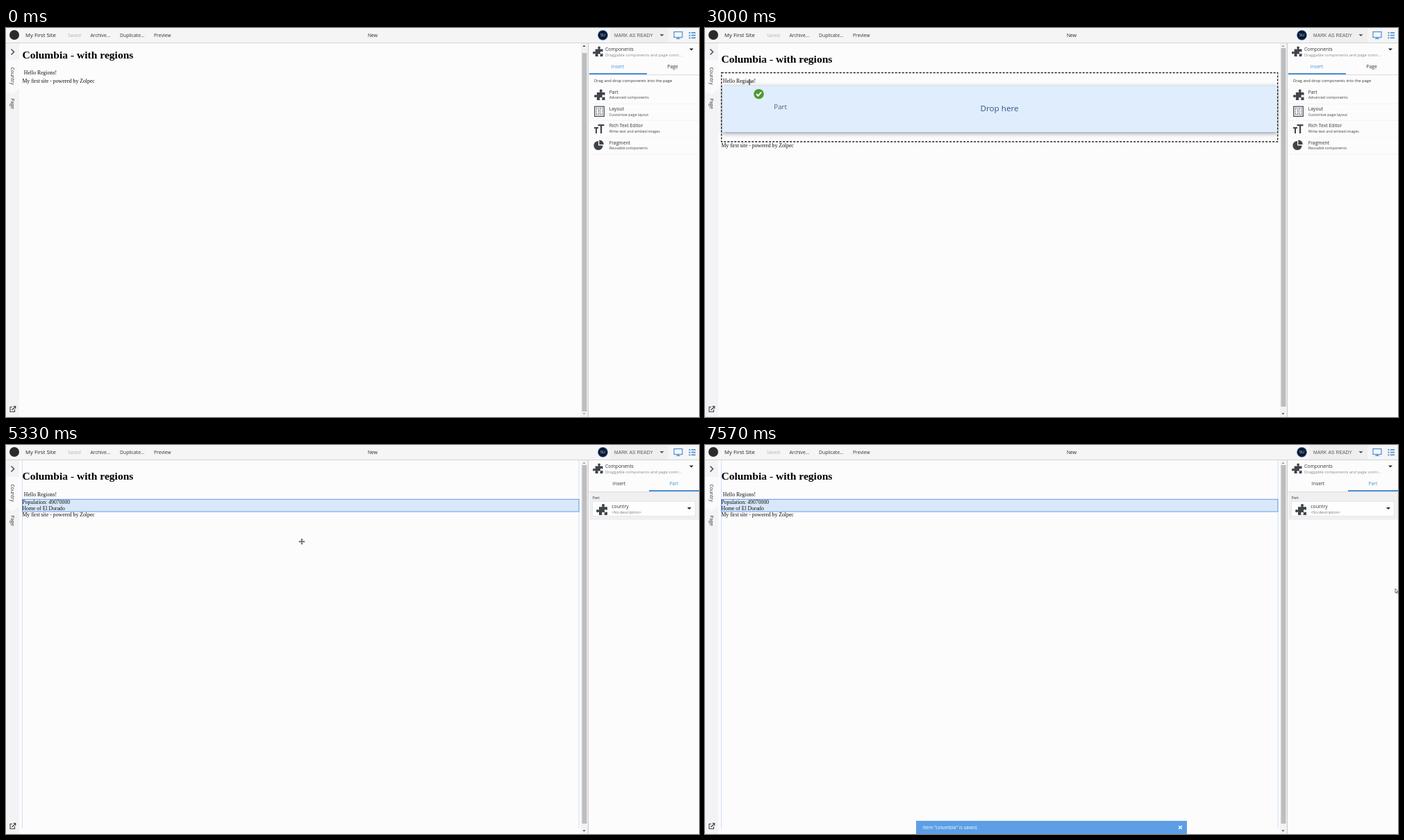
An HTML page with a canvas that plays this animation: 998 by 561 pixels, repeating every 8730 ms.

```html
<!DOCTYPE html>
<html lang="en">
<head>
<meta charset="utf-8">
<title>Page editor</title>
<style>
html, body { margin: 0; width: 100%; height: 100%; overflow: hidden; background: #fcfcfd; }
canvas { display: block; }
</style>
</head>
<body>
<canvas id="stage" width="998" height="561"></canvas>
<script>
const ctx = document.getElementById('stage').getContext('2d');
const LOOP = 8730;
const UI = '"Open Sans", sans-serif';
const SERIF = '"Liberation Serif", serif';
const ARIAL = '"Liberation Sans", sans-serif';
const INK = '#333', ICON = '#3f444b', BLUE = '#4a90d4', PAPER = '#fcfcfd', BAR = '#f5f5f6';

// Moments (ms) at which the scene changes state
const AT = { enter: 530, grab: 1570, overPage: 1720, overRegion: 2470, drop: 3370,
  focus: 4270, open: 4500, pick: 5330, toast: 5413, arrow: 6230 };

// Pointer positions: time, x, y
const TRACK = [
  [530, 994, 176], [970, 907, 98], [1270, 882, 95], [1570, 882, 95],
  [2170, 235, 103], [2470, 130, 90], [2900, 64, 78], [3400, 64, 78],
  [4200, 545, 112], [4570, 545, 112], [4970, 426, 139], [6230, 426, 140],
  [6260, 425, 135], [6870, 425, 135], [7570, 994, 207]
];

const PUZZLE = new Path2D('M.25 .27H.53C.58 .2 .5 .17 .5 .11A.13 .11 0 0 1 .76 .11C.76 .17 .68 .2 .73 .27H1V.53' +
  'C.93 .58 .9 .5 .84 .5A.1 .13 0 0 0 .84 .76C.9 .76 .93 .68 1 .73V1H.73C.68 .93 .76 .9 .76 .84' +
  'A.13 .1 0 0 0 .5 .84C.5 .9 .58 .93 .53 1H.25V.73C.2 .68 .17 .76 .11 .76A.11 .13 0 0 1 .11 .5C.17 .5 .2 .58 .25 .53Z');
const ARROW = new Path2D('M0 0V7.4L1.7 5.9L2.8 8.4L3.9 7.9L2.8 5.4H5Z');
const HAND = new Path2D('M-.8 0Q0 -.8 .8 0V3L3.6 3.8Q4.2 4.2 4 5.5L3.2 8.5H-1L-3 5.4Q-3 4.5 -2 4.8L-.8 5.8Z');
const CROSS = new Path2D('M0 -5L1.6 -3H.6V-.6H3V-1.6L5 0L3 1.6V.6H.6V3H1.6L0 5L-1.6 3H-.6V.6H-3V1.6L-5 0L-3 -1.6V-.6H-.6V-3H-1.6Z');

function rect(x, y, w, h, color) {
  ctx.fillStyle = color;
  ctx.fillRect(x, y, w, h);
}

function frame(x, y, w, h, color, width = 1) {
  ctx.strokeStyle = color;
  ctx.lineWidth = width;
  ctx.strokeRect(x, y, w, h);
}

function disc(x, y, r, color) {
  ctx.fillStyle = color;
  ctx.beginPath();
  ctx.arc(x, y, r, 0, Math.PI * 2);
  ctx.fill();
}

function poly(points, color) {
  ctx.fillStyle = color;
  ctx.beginPath();
  points.forEach(([x, y]) => ctx.lineTo(x, y));
  ctx.fill();
}

function line(points, color, width = 1) {
  ctx.strokeStyle = color;
  ctx.lineWidth = width;
  ctx.beginPath();
  points.forEach(([x, y], i) => i ? ctx.lineTo(x, y) : ctx.moveTo(x, y));
  ctx.stroke();
}

// y is the middle of the capital letters
function text(str, x, y, size = 6.8, color = INK, { font = UI, style = '', align = 'left' } = {}) {
  ctx.font = `${style} ${size}px ${font}`;
  ctx.textAlign = align;
  ctx.fillStyle = color;
  ctx.fillText(str, x, y + size * 0.35);
}

function shape(path, x, y, scale, fill, stroke) {
  ctx.save();
  ctx.translate(x, y);
  ctx.scale(scale, scale);
  ctx.fillStyle = fill;
  ctx.fill(path);
  if (stroke) {
    ctx.strokeStyle = stroke;
    ctx.lineWidth = 0.8;
    ctx.stroke(path);
  }
  ctx.restore();
}

const puzzle = (x, y, size, color = ICON) => shape(PUZZLE, x, y, size, color);
const caret = (x, y, color = '#222', r = 3) => poly([[x - r, y - r / 2], [x + r, y - r / 2], [x, y + r / 2]], color);
const serif = (str, x, y) => text(str, x, y, 7.78, '#111', { font: SERIF });

function pointerAt(t) {
  const i = TRACK.findIndex(k => k[0] > t);
  if (i < 0) return TRACK[TRACK.length - 1].slice(1);
  if (i === 0) return TRACK[0].slice(1);
  const [t0, x0, y0] = TRACK[i - 1], [t1, x1, y1] = TRACK[i];
  const p = (t - t0) / (t1 - t0);
  return [x0 + (x1 - x0) * p, y0 + (y1 - y0) * p];
}

function drawTopBar(t) {
  rect(0, 0, 998, 21, BAR);
  rect(0, 21, 998, 1, '#d2d2d4');
  disc(12, 10, 7, '#2b2b2b');
  text('My First Site', 28, 10.5, 7.78, '#222');
  const dirty = t >= AT.drop && t < AT.pick;
  const shift = dirty ? -4.2 : 0;
  text(dirty ? 'Save' : 'Saved', 89, 10.5, 6.8, dirty ? INK : '#b4b4b6');
  text('Archive...', 121.5 + shift, 10.5);
  text('Duplicate...', 164 + shift, 10.5);
  text('Preview', 213 + shift, 10.5);
  text('New', 528 + shift / 2, 10.5, 6.8, '#222', { align: 'center' });

  disc(859.5, 10.3, 7.4, '#4b7fb5');
  disc(859.5, 10.3, 6.6, '#0c1a33');
  text('SU', 859.5, 10.4, 5.4, '#dde6f2', { align: 'center' });
  rect(870, 0, 84, 21, '#efeff0');
  text('MARK AS READY', 876, 10.3, 6.8, '#5a5a5c', { font: ARIAL });
  caret(944.5, 10.5, '#555');
  frame(962, 5.5, 12, 8, BLUE, 1.2);
  rect(967, 14, 2, 2, BLUE);
  rect(965, 15, 6, 1, BLUE);
  for (const y of [6, 9.7, 13.4]) {
    rect(983.5, y, 2, 2, BLUE);
    rect(987, y, 6, 1.7, BLUE);
  }
}

function verticalText(str, y) {
  ctx.save();
  ctx.translate(9.7, y);
  ctx.rotate(Math.PI / 2);
  text(str, 0, 0);
  ctx.restore();
}

function drawSidebar() {
  rect(0, 22, 19, 539, '#f3f3f5');
  poly([[0, 46], [19, 46], [19, 88], [10, 95], [0, 92]], '#fafafc');
  line([[7.5, 30.5], [11.5, 34.5], [7.5, 38.5]], '#555', 1.6);
  verticalText('Country', 56.5);
  verticalText('Page', 101.5);
  line([[9, 546.5], [6, 546.5], [6, 553.5], [12.5, 553.5], [12.5, 550]], '#444', 1.1);
  line([[8.5, 551], [13.5, 546]], '#444', 1.2);
  line([[10.5, 545.5], [13.7, 545.5], [13.7, 549]], '#444', 1.2);
}

function drawScrollbar(atTop) {
  rect(828, 22, 10, 539, '#f2f2f3');
  rect(829.5, atTop ? 29 : 36, 7, 517, '#bdbdbf');
  rect(838, 22, 1, 539, '#c9c9cc');
  poly([[830.5, 27], [834.5, 27], [832.5, 24.8]], atTop ? '#999' : '#333');
  caret(832.5, 556.5, atTop ? '#333' : '#999', 2);
}

const ITEMS = [
  ['Part', 'Advanced components'],
  ['Layout', 'Customize page layout'],
  ['Rich Text Editor', 'Write text and embed images'],
  ['Fragment', 'Reusable components']
];

function drawItemIcon(i) {
  if (i === 0) puzzle(847, 88.5, 15.5);
  if (i === 1) {
    frame(847.7, 113.2, 13.6, 14.2, ICON, 1.2);
    ctx.setLineDash([1.3, 1.1]);
    frame(850.2, 115.8, 3.2, 9, ICON, 1.1);
    frame(855.6, 115.8, 3.2, 9, ICON, 1.1);
    ctx.setLineDash([]);
  }
  if (i === 2) {
    rect(847, 143, 6, 2, ICON);
    rect(849, 143, 2, 9, ICON);
    rect(852.5, 139, 9, 2.2, ICON);
    rect(856, 139, 2.2, 13, ICON);
  }
  if (i === 3) {
    ctx.fillStyle = ICON;
    for (const [x, y, from, to] of [[853, 169.5, 0, Math.PI * 1.5], [854.3, 168, -Math.PI / 2, 0]]) {
      ctx.beginPath();
      ctx.moveTo(x, y);
      ctx.arc(x, y, 6.6, from, to);
      ctx.fill();
    }
  }
}

function drawInsertTab(hoverY) {
  text('Drag and drop components into the page', 847, 76.3, 5.83);
  ITEMS.forEach(([name, note], i) => {
    const top = 85 + i * 24.4;
    const hovered = hoverY >= top && hoverY < top + 24.4;
    if (hovered) rect(840, top, 158, 24.4, '#f2f2f2');
    rect(840, top + 24, 158, 0.6, '#efeff2');
    text(name, 868.7, top + 7.2);
    text(note, 868.7, top + 15.4, 5.35, '#444');
    drawItemIcon(i);
  });
}

function drawPartTab(chosen) {
  rect(840, 68, 158, chosen ? 40 : 34, '#f0f0f2');
  text('Part', 844.5, 76.3, 5.5);
  const h = chosen ? 22 : 16;
  rect(844, 81, 149, h, '#fefefe');
  frame(844.5, 81.5, 148, h - 1, '#e2e2e5', 0.8);
  caret(984, chosen ? 91.5 : 89);
  if (chosen) {
    puzzle(850, 85, 16);
    text('country', 872.3, 88.8);
    text('<No description>', 872.3, 97.3, 5.35, '#777');
  } else {
    text('Type to search...', 850, 89, 6.3, '#777', { style: 'italic' });
  }
}

function drawPanel(t, py) {
  rect(839, 22, 159, 539, PAPER);
  puzzle(845, 26.5, 14.5);
  text('Components', 863, 30.2);
  text('Draggable components and page contr...', 863, 38.5, 5.83, '#888');
  caret(987, 31);
  rect(839, 67, 159, 0.8, '#d5d5d8');
  const dropped = t >= AT.drop;
  const tab = (name, x, on) => text(name, x, 55.8, 6.8, on ? BLUE : INK, { align: 'center' });
  tab('Insert', dropped ? 883 : 881, !dropped);
  tab(dropped ? 'Part' : 'Page', dropped ? 962 : 960, dropped);
  rect(dropped ? 926 : 840, 65, dropped ? 72 : 83, 2, BLUE);
  if (dropped) drawPartTab(t >= AT.pick);
  else drawInsertTab(t >= AT.enter && t < AT.grab ? py : -1);
}

function drawDropZone() {
  ctx.save();
  ctx.shadowColor = 'rgba(40,50,70,.5)';
  ctx.shadowBlur = 6;
  ctx.shadowOffsetY = 1.5;
  rect(25, 83.5, 799, 66.5, '#e0edfc');
  ctx.restore();
  ctx.setLineDash([3, 2]);
  frame(23.7, 64.5, 801, 99.5, '#222', 1.4);
  ctx.setLineDash([]);
  text('Drop here', 424, 115.5, 11.66, '#31548a', { align: 'center' });
}

function drawOption() {
  rect(292.5, 121, 263.5, 25, '#f0f3f7');
  frame(292.5, 121, 263.5, 24.5, '#c4d3e4', 0.8);
  puzzle(298, 126, 15);
  text('country', 321, 130);
  text('<No description>', 321, 138.5, 5.35, '#777');
}

function drawSelector(t) {
  rect(23.5, 78.5, 801.5, 67, '#dfeefd');
  puzzle(398, 86, 52, '#cddced');
  frame(23.7, 78.9, 801, 66.4, '#1e2430', 1.4);
  rect(292.5, 102.5, 263.5, 18.5, '#fefefe');
  frame(292.5, 102.5, 263.5, 18.5, '#93c2f2');
  text('Type to search...', 298, 112, 7.78, '#777', { style: 'italic' });
  if (t >= AT.focus) rect(297.8, 107, 0.7, 10, '#333');
  caret(546, 112);
  if (t >= AT.open) drawOption();
}

function drawPage(t) {
  rect(19, 22, 809, 539, PAPER);
  const inRegion = t >= AT.overRegion;
  const dropped = t >= AT.drop;
  const spread = t >= AT.overPage;
  text('Columbia - with regions', 23.4, inRegion ? 45 : 38.4, 15.55, '#000', { font: SERIF, style: 'bold' });

  let helloY = 64.4, footerY = 76;
  if (spread) [helloY, footerY] = [69.4, 90.6];
  if (inRegion) [helloY, footerY] = [76, 169.6];
  if (dropped) [helloY, footerY] = [71.4, t < AT.pick ? 154.8 : 100.4];

  if (dropped) {
    rect(23.2, 22, 0.8, 531, '#c6d9ef');
    rect(824.7, 22, 0.8, 531, '#c6d9ef');
  }
  if (t >= AT.pick) {
    rect(23.5, 78, 801.5, 18, '#d9e8f9');
    frame(23.5, 78.3, 801.5, 17.8, '#5a92e4', 0.9);
    serif('Population: 49070000', 23.4, 82.4);
    serif('Home of El Dorado', 23.4, 91.4);
  } else if (dropped) {
    drawSelector(t);
  } else if (inRegion) {
    drawDropZone();
  }
  serif('Hello Regions!', 25.8, helloY);
  serif('My first site - powered by Zolpec', 23.4, footerY);
}

function drawDragBadge(t, x, y) {
  if (t < AT.overRegion) {
    const bx = x + 29, by = y + 18.5;
    disc(bx, by, 7.3, '#b80f14');
    ctx.strokeStyle = '#fff';
    ctx.lineWidth = 1.3;
    ctx.beginPath();
    ctx.arc(bx, by, 4, 0, Math.PI * 2);
    ctx.stroke();
    line([[bx - 2.8, by - 2.8], [bx + 2.8, by + 2.8]], '#fff', 1.3);
  } else {
    const bx = x + 13.5, by = y + 17.2;
    disc(bx, by, 7.3, '#4e9a2e');
    line([[bx - 3.5, by], [bx - 1, by + 2.6], [bx + 3.6, by - 2.5]], '#fff', 2);
    text('Part', x + 35.3, y + 35.3, 9.72, '#4b5d7a');
  }
}

function drawToast(t) {
  const p = Math.min(1, (t - AT.toast) / 400);
  if (p <= 0) return;
  const h = 19 * (0.5 - Math.cos(Math.PI * p) / 2);
  const mid = 561 - h / 2;
  ctx.save();
  ctx.beginPath();
  ctx.rect(304, 561 - h, 390, h);
  ctx.clip();
  rect(304, 542, 390, 19, '#5c9fe6');
  text('Item "columbia" is saved.', 313.8, mid, 6.8, '#fff');
  line([[682.2, mid - 2.3], [686.8, mid + 2.3]], '#fff', 1.5);
  line([[686.8, mid - 2.3], [682.2, mid + 2.3]], '#fff', 1.5);
  ctx.restore();
}

function drawPointer(t, x, y) {
  if (t < AT.enter) return;
  const overButton = t > 4180 && t < AT.pick;
  const moving = (t >= AT.overRegion && t < AT.drop) || (t >= AT.pick && t < AT.arrow);
  if (moving) shape(CROSS, x, y, 0.95, '#444', '#e8e8ec');
  if (moving) shape(CROSS, x, y, 0.85, '#555');
  else if (t < AT.grab || overButton) shape(HAND, x, y - 2, 1, '#fff', '#333');
  else shape(ARROW, x, y, 0.85, '#fff', '#333');
}

function draw() {
  const t = performance.now() % LOOP;
  const [x, y] = pointerAt(t);
  drawPage(t);
  drawScrollbar(t >= AT.overRegion);
  drawSidebar();
  drawPanel(t, y);
  drawTopBar(t);
  drawToast(t);
  if (t >= AT.grab && t < AT.drop) drawDragBadge(t, x, y);
  drawPointer(t, x, y);
  requestAnimationFrame(draw);
}
draw();
</script>
</body>
</html>
```
